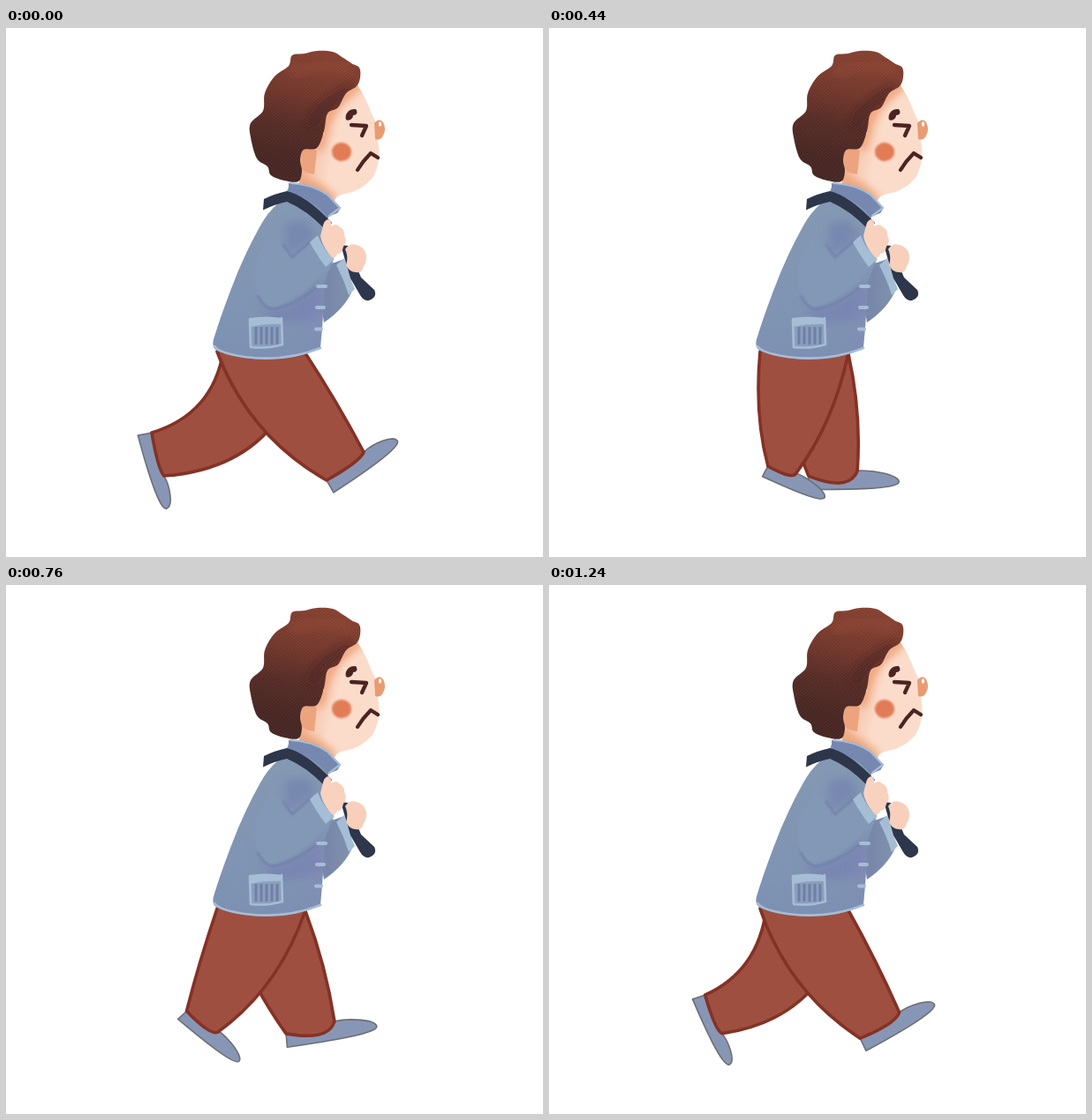
Write an HTML page that moves like this. It is 608 px wide and 600 px high and loops after 1280 ms.

```html
<!DOCTYPE html>
<html lang="en">
<head>
<meta charset="utf-8">
<title>Walking man</title>
<style>
  html, body { margin: 0; width: 100%; height: 100%; overflow: hidden; background: #fff; }
  svg { display: block; width: 100vw; height: 100vh; }
  .shoe { fill: #8896b5; stroke: #6d6f74; stroke-width: 1.6; stroke-linejoin: round; }
  .trouser { fill: #9f4f40; stroke: #843226; stroke-width: 3.6; stroke-linejoin: round; stroke-linecap: round; }
  .line { fill: none; stroke: #4b2422; stroke-width: 4.3; stroke-linecap: round; stroke-linejoin: round; }
  .trim { fill: none; stroke: #a6bdd5; stroke-linecap: round; stroke-linejoin: round; }
  .fold { fill: none; stroke: #6f7caa; stroke-width: 2.4; stroke-opacity: .8; filter: url(#haze); }
  .cuff { fill: #a6bed5; }
  .stick { fill: #2d364a; }
  .soft { filter: url(#blur); }
</style>
</head>
<body>
<svg viewBox="0 0 608 600" xmlns="http://www.w3.org/2000/svg">
  <defs>
    <filter id="blur" x="-50%" y="-50%" width="200%" height="200%"><feGaussianBlur stdDeviation="5"/></filter>
    <filter id="haze" x="-50%" y="-50%" width="200%" height="200%"><feGaussianBlur stdDeviation="1.2"/></filter>
    <linearGradient id="hairFill" x1=".6" y1="0" x2=".42" y2="1">
      <stop offset="0" stop-color="#86402f"/><stop offset=".3" stop-color="#76382c"/>
      <stop offset=".58" stop-color="#572b25"/><stop offset=".85" stop-color="#472522"/>
    </linearGradient>
    <linearGradient id="skin" gradientUnits="userSpaceOnUse" x1="338" y1="120" x2="400" y2="135">
      <stop offset="0" stop-color="#eda67f"/><stop offset=".3" stop-color="#f7cbb3"/>
      <stop offset=".6" stop-color="#fbdccb"/>
    </linearGradient>
    <linearGradient id="coat" gradientUnits="userSpaceOnUse" x1="300" y1="200" x2="320" y2="375">
      <stop offset="0" stop-color="#8499b4"/><stop offset=".6" stop-color="#8095b4"/><stop offset="1" stop-color="#7d90b4"/>
    </linearGradient>
    <linearGradient id="farArm" x1="0" y1="0" x2="1" y2="0">
      <stop offset="0" stop-color="#7482a8"/><stop offset="1" stop-color="#8192ad"/>
    </linearGradient>
    <pattern id="weave" width="4" height="4" patternUnits="userSpaceOnUse" patternTransform="rotate(8)">
      <path d="M0 1h2M2 3h2" stroke="#fff" stroke-opacity=".08"/>
      <path d="M2 1h2M0 3h2" stroke="#000" stroke-opacity=".08"/>
    </pattern>
    <path id="hair"/>
    <path id="body" d="M321 178Q316 192 308 199Q296 209 287 226Q267 262 253 301Q242 330 236 350Q231 363 241 367Q266 376 298 376Q334 375 356 362L358 340L361 288L371 262L362 232L365 214L376 209L350 186Z"/>
    <path id="face" d="M362 80L398 65Q407 78 413 95L420 110L421 128Q426 150 415 170Q402 185 384 188Q374 189 372 196L368 204L332 184L332 160L336 140L360 120Z"/>
    <clipPath id="inHair"><use href="#hair"/></clipPath>
    <clipPath id="inBody"><use href="#body"/></clipPath>
    <clipPath id="inFace"><use href="#face"/></clipPath>
  </defs>

  <g id="legs"></g>

  <g id="head">
    <use href="#face" fill="url(#skin)"/>
    <g clip-path="url(#inFace)">
      <path class="soft" d="M402 62L372 88L362 106L354 138" fill="none" stroke="#ee9f74" stroke-width="10"/>
      <path class="soft" d="M330 166Q356 172 374 192L368 208L328 190Z" fill="#eca57c"/>
    </g>
    <path d="M352 139Q341 132 334 140Q330 150 335 160Q338 164 344 165L349 166Z" fill="#eba47e"/>
    <path d="M417 108Q423 101 427 107Q431 115 427 122Q424 128 418 126Z" fill="#e99b72"/>
    <ellipse cx="423.500" cy="109" rx="1.600" ry="2.800" fill="#fff"/>
    <ellipse cx="380" cy="140.500" rx="11" ry="10.500" fill="#e27b56" filter="url(#haze)"/>
    <path d="M385 104C383 98 388 91 396 92C399 96 397 99 393 99C393 103 388 106 385 104Z" fill="#4b2422"/>
    <path class="line" d="M391 110L408 111L403 122"/>
    <path class="line" d="M398 161Q404 151 413 142L421 147"/>
    <use href="#hair" fill="url(#hairFill)"/>
    <g clip-path="url(#inHair)">
      <path class="soft" d="M322 52Q350 36 392 48" fill="none" stroke="#9c4a37" stroke-opacity=".4" stroke-width="14"/>
      <path class="soft" d="M346 112Q356 84 392 70" fill="none" stroke="#45211f" stroke-opacity=".6" stroke-width="12"/>
    </g>
    <use href="#hair" fill="url(#weave)"/>
  </g>

  <g id="jacket">
    <path d="M350 270L372 266L383 262L393 296Q384 318 360 334Z" fill="url(#farArm)"/>
    <path class="cuff" d="M374 269L383 261Q388 280 395 296L388 303Q382 284 374 269Z"/>
    <use href="#body" fill="url(#coat)"/>
    <g clip-path="url(#inBody)">
      <path class="soft" d="M316 222L318 258L352 236L340 218Z" fill="#727fb0" fill-opacity=".6"/>
      <path class="soft" d="M280 290Q286 318 304 320Q336 312 360 286L360 330L300 336Z" fill="#7580b2" fill-opacity=".7"/>
      <path class="soft" d="M350 290L364 290L358 362L340 366Z" fill="#8389b8" fill-opacity=".4"/>
      <path d="M284 262Q276 304 298 318Q332 311 372 264L346 240L324 261L314 246L300 236Z" fill="#8299b7" filter="url(#haze)"/>
      <path class="fold" d="M285 303Q290 316 302 319Q326 315 352 294"/>
      <path class="fold" d="M313 245L324 260L346 241"/>
    </g>
    <use href="#body" fill="url(#weave)" opacity=".6"/>
    <path class="trim" stroke-width="2.600" d="M236 361Q242 369 270 373Q316 379 356 363"/>
    <path d="M320 176Q346 175 365 189L379 204L375 210L364 214Q348 194 320 187Z" fill="#7687b0"/>
    <path class="trim" stroke-width="2.200" d="M322 176Q346 177 364 189L378 204L366 213"/>
    <path class="trim" stroke-width="4" d="M353 293H362M352 317H360M351 341.500H357"/>
    <path d="M276 330L312 329L313 359L278 362Z" fill="#8a9fbd"/>
    <g id="ribs" stroke="#707fa6" stroke-width="3"></g>
    <path class="trim" stroke-width="2.600" d="M276 331L277 362Q296 364 313 359L312 329"/>
    <path class="cuff" d="M275 329Q295 326 313 329V336Q294 335 276 339Z"/>
  </g>

  <g id="carry">
    <path class="stick" d="M292 194Q304 188 318 185Q340 190 369 221L362 229Q340 206 318 197Q304 200 291 206.500Z"/>
    <path class="stick" d="M379 246L387 247L402 283L417 297Q421 305 411 309Q405 310 401 303L390 284Z"/>
    <path class="cuff" d="M344 243L353 235Q359 252 372 262L362 271Q352 258 344 243Z"/>
    <path d="M358 228Q360 217 365 217Q369 219 368 225Q374 221 377 225Q384 229 383 235Q387 242 382 248Q380 257 375 256Q374 261 369 260Q358 248 356 236Z" fill="#f8d1bf"/>
    <path d="M384 251Q389 243 397 246Q407 249 408 259Q408 267 405 270Q403 279 396 277Q389 277 385 269Q388 260 384 251Z" fill="#f7cfbb"/>
  </g>
</svg>
<script>
const LOOP = 1280;
const $ = id => document.getElementById(id);
const points = text => text.split(' ').map(p => p.split(',').map(Number));

function addPath(parent, d, className = '') {
  const el = document.createElementNS('http://www.w3.org/2000/svg', 'path');
  el.setAttribute('class', className);
  el.setAttribute('d', d);
  parent.append(el);
  return el;
}

// Closed curve running through every point.
function smooth(pts) {
  const get = i => pts[(i + pts.length) % pts.length];
  const handle = (i, side) => get(i).map((v, k) => v + side * (get(i + 1)[k] - get(i - 1)[k]) / 6);
  return `M${pts[0]}` + pts.map((_, i) => `C${handle(i, 1)} ${handle(i + 1, -1)} ${get(i + 1)}`).join('') + 'Z';
}

// Point at fraction t from p to q, pushed sideways by out pixels.
function at(p, q, t, out = 0) {
  const dx = q[0] - p[0], dy = q[1] - p[1], len = Math.hypot(dx, dy);
  return [p[0] + dx * t - dy / len * out, p[1] + dy * t + dx / len * out];
}

// A leg hangs from two hip points; each pose gives the hem's back and front and the toe.
// The trouser edges bow with the swing, the hem rounds as it gets level.
const farPass = points('259,507 315,513 361,536');
const far = {
  hips: points('246,367 339,370'), plumb: 280, bow: .33, sag: .47,
  poses: [points('165,459 179,508 182,545'), farPass, points('352,510 406,484 455,479'), farPass]
};
const near = {
  hips: points('239,367 339,369'), plumb: 190, bow: .2, sag: .25,
  poses: [
    points('363,513 405,481 443,468'), points('300,519 338,506 386,523'),
    points('161,460 183,503 189,548'), points('277,522 338,511 389,527')
  ]
};

function trouser({ hips: [rear, fore], plumb, bow, sag }, [back, front]) {
  const level = Math.abs(front[0] - back[0]) - Math.abs(front[1] - back[1]);
  const round = Math.max(4, level / 2);
  const rearKnee = at(rear, back, .5, (back[0] - plumb) * bow);
  const foreKnee = at(front, fore, .5, 3 + Math.max(0, fore[0] - front[0]) * sag);
  return `M${rear} Q${rearKnee} ${back} C${at(back, front, .35, round / 2)} ` +
    `${at(back, front, .85, round)} ${front} Q${foreKnee} ${fore}`;
}

function shoe(leg, [back, front, toe]) {
  const heel = at(back, toe, 0, 16);
  return `M${back} L${heel} C${at(heel, toe, .4, 4)} ${at(heel, toe, 1, 9)} ${toe} ` +
    `C${at(heel, toe, 1, -8)} ${at(front, toe, .35, -6)} ${front} Z`;
}

function walk(leg, part) {
  const paths = leg.poses.map(pose => part(leg, pose));
  const el = addPath($('legs'), paths[0], part.name);
  // The walk advances 25 times a second.
  const steps = [...paths, paths[0]].map(d => ({ d: `path("${d}")`, easing: 'steps(8, end)' }));
  el.animate(steps, { duration: LOOP, iterations: Infinity }).startTime = document.timeline.currentTime;
}

for (const leg of [far, near]) {
  walk(leg, shoe);
  walk(leg, trouser);
}

$('hair').setAttribute('d', smooth(points(
  '320,43 324,31 338,29 352,26 370,27 382,34 391,40 400,45 401,56 397,66 385,74 376,90 364,97 ' +
  '360,117 352,136 337,138 333,150 335,162 331,174 315,173 300,167 296,157 284,148 277,124 277,108 291,94 293,74 304,55'
)));

for (let x = 283; x < 310; x += 6) addPath($('ribs'), `M${x} 339V359`);
</script>
</body>
</html>
```
